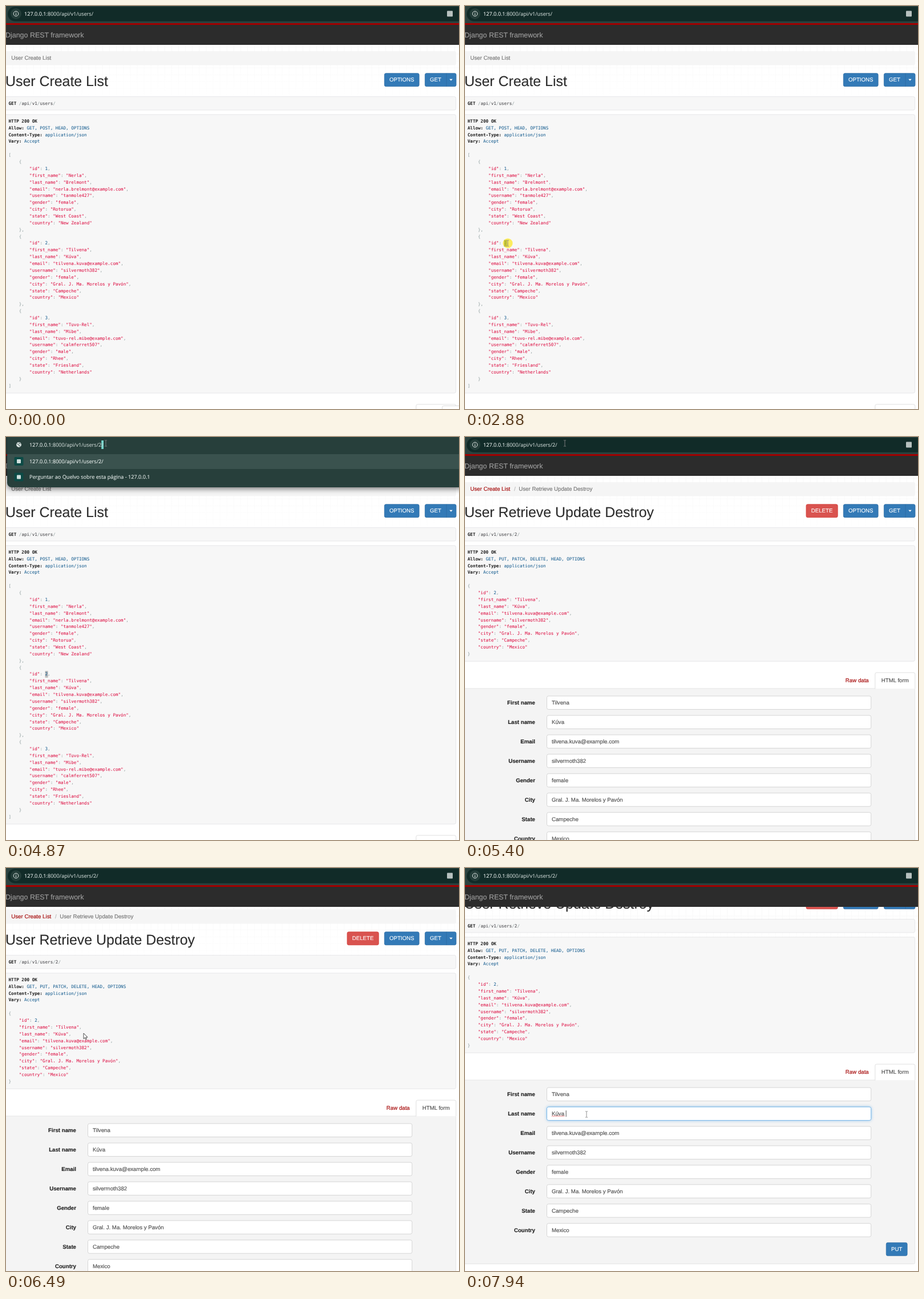
These frames come from a looping animation (794x705 px, 8000 ms). An HTML page:

```html
<!DOCTYPE html>
<html lang="en">
<head>
<meta charset="utf-8">
<title>User API</title>
<style>
  html, body { margin: 0; width: 100%; height: 100%; overflow: hidden; background: #fff; }
  svg { display: block; width: 794px; height: 705px; }
  text, tspan { fill: currentColor; stroke: currentColor; }
  text {
    white-space: pre; text-rendering: geometricPrecision; stroke-width: .14;
    font: 9.69px "Liberation Sans", Arial, sans-serif; color: #2d2d2d;
  }
  .mid { text-anchor: middle; }
  .label { text-anchor: end; font-weight: bold; color: #222; }
  .value { color: #4c4c4c; }
  .link { color: #a30000; }
  .muted { color: #737373; }
  .white { color: #fff; }
  .title { font-size: 24.9px; }
  .brand { font-size: 12.46px; color: #9d9d9d; }
  .code { font: 7.6px "DejaVu Sans Mono", "Noto Sans Mono", monospace; color: #48484c; stroke-width: .04; }
  .code .b { font-weight: bold; color: #222; }
  .code .str { color: #d14; }
  .code .lit { color: #195f91; }
  .code .pun { color: #93a1a1; }
  .ui { font: 9.12px "Open Sans", "Noto Sans", sans-serif; color: #e3eae8; }
  .ui .dim { color: #c3cecb; }
  .ui.dark { color: #0b2320; }
  .menu { filter: drop-shadow(0 3px 5px rgba(0, 0, 0, .5)); }
  .glow { filter: drop-shadow(0 0 2.5px rgba(102, 175, 233, .7)); }
</style>
</head>
<body>
<svg id="stage" viewBox="0 0 794 705"></svg>
<script>
const RIGHT = 789, LINE = 11.865, CHAR = 4.575, CODE_X = 4.5, PRE_TOP = 189.5;
const ROW_TOP = 464.8, ROW_STEP = 33.95;
const URL_LIST = '/api/v1/users/', URL_ITEM = '/api/v1/users/2/';

const FIELDS = ['id', 'first_name', 'last_name', 'email', 'username', 'gender', 'city', 'state', 'country'];
const USERS = [
  [1, 'Nerla', 'Brelmont', 'tanmole427', 'female', 'Rotorua', 'West Coast', 'New Zealand'],
  [2, 'Tilvena', 'Kúva', 'silvermoth382', 'female', 'Gral. J. Ma. Morelos y Pavón', 'Campeche', 'Mexico'],
  [3, 'Tuvo-Rel', 'Mibe', 'calmferret507', 'male', 'Rhee', 'Friesland', 'Netherlands']
].map(([id, first, last, ...rest]) => {
  const plain = `${first}.${last}`.toLowerCase().normalize('NFD').replace(/[\u0300-\u036f]/g, '');
  return [id, first, last, `${plain}@example.com`, ...rest];
});

// SVG helpers
const rect = (x, y, w, h, fill, stroke = 'none', r = 0, extra = '') =>
  `<rect x="${x}" y="${y}" width="${w}" height="${h}" rx="${r}" fill="${fill}" stroke="${stroke}" stroke-width=".8" ${extra}/>`;
const text = (x, y, s, cls = '') => `<text x="${x}" y="${y}" class="${cls}">${s}</text>`;
const span = (cls, s) => `<tspan class="${cls}">${s}</tspan>`;
const group = (id, inner) => `<g id="${id}">${inner}</g>`;
const path = (d, extra) => `<path d="${d}" ${extra}/>`;

const paintJson = line => line.replace(/("[^"]*")|(\d+)|([^\s"\d]+)/g,
  (m, str, num) => span(str ? 'str' : num ? 'lit' : 'pun', m));
const paintHeader = line => {
  const [name, value] = line.split(': ');
  return value ? span('b', name + ':') + ' ' + span('lit', value) : span('b', line);
};
const userLines = (user, pad) => [
  pad + '{',
  ...FIELDS.map((f, i) => `${pad}    "${f}": ${JSON.stringify(user[i])}${i < FIELDS.length - 1 ? ',' : ''}`),
  pad + '}'
];

const BUTTON_Y = 117.8, BUTTON_H = 22.9;
const button = (x, w, label, y = BUTTON_Y, fill = '#337ab7', stroke = '#2e6da4') =>
  rect(x, y, w, BUTTON_H, fill, stroke, 2.6) + text(x + w / 2, y + 14.5, label, 'mid white');

const getButton = hover => button(734.4, 54.6, '')
  + (hover ? group('hover', rect(734.4, BUTTON_Y, 37.6, BUTTON_H, '#286090', '#204d74', 2.6)) : '')
  + text(753, BUTTON_Y + 14.5, 'GET', 'mid white')
  + path(`M772 ${BUTTON_Y}v${BUTTON_H}`, 'stroke="#2e6da4"')
  + path('M777.2 127.8H782.8L780 130.7Z', 'fill="#fff"');

function page({ crumb, title, url, allow, json, buttons, hover = false, under = '' }) {
  const lines = ['HTTP 200 OK', `Allow: ${allow}`, 'Content-Type: application/json', 'Vary: Accept'].map(paintHeader)
    .concat('', json.map(paintJson));
  const height = lines.length * LINE + 12.6;
  const tabs = PRE_TOP + height + 20;
  return rect(-4, 79, RIGHT + 4, 24.4, '#f5f5f5', 'none', 2.8) + crumb
    + text(-1, 140.2, title, 'title') + buttons + getButton(hover)
    + rect(-4, 158.6, RIGHT + 3.6, 23.4, '#f7f7f7', '#e1e1e4', 2.8)
    + text(CODE_X, 173, span('b', 'GET ') + url.split('/').join(span('pun', '/')), 'code')
    + rect(-4, PRE_TOP + .4, RIGHT + 3.6, height, '#f7f7f7', '#e1e1e4', 2.8) + under
    + lines.map((s, i) => s && text(CODE_X, 203.9 + LINE * i, s, 'code')).join('')
    + rect(-4, tabs + 28, RIGHT + 3.6, 321.6, '#f4f4f4', '#e0e0e0', 2)
    + path(`M718.8 ${tabs + 28.6}V${tabs + 3}q0-2.8 2.8-2.8H786q2.8 0 2.8 2.8V${tabs + 28.6}`, 'fill="#fff" stroke="#ddd" stroke-width=".9"')
    + text(687.3, tabs + 17.1, 'Raw data', 'mid link') + text(753.8, tabs + 17.1, 'HTML form', 'mid value');
}

function form(user) {
  const rows = FIELDS.slice(1).map((f, i) => {
    const y = ROW_TOP + ROW_STEP * i;
    const label = f[0].toUpperCase() + f.slice(1).replace('_', ' ');
    return text(123, y + 3.3, label, 'label') + rect(143.5, y - 11.7, 568.2, 23.4, '#fff', '#ccc', 2.8)
      + (i === 1 ? group('focus', rect(143.5, y - 11.7, 568.2, 23.4, '#fff', '#66afe9', 2.8, 'class="glow"')
        + path(`M152 ${y + 5}` + 'l1.4-1.4l1.4 1.4'.repeat(8), 'fill="none" stroke="#e23b3b" stroke-width=".8"')
        + group('caret', rect(176.7, y - 5.6, .9, 11, '#444'))) : '')
      + text(152, y + 3.3, user[i + 1], 'value');
  });
  return rows.join('') + button(738.3, 36.8, 'PUT', 724.4);
}

const options = button(663.3, 60.8, 'OPTIONS');

const listPage = page({
  crumb: text(9.3, 94, 'User Create List', 'muted'), hover: true,
  title: 'User Create List', url: URL_LIST, allow: 'GET, POST, HEAD, OPTIONS', buttons: options,
  json: ['[', ...USERS.flatMap((u, i) => userLines(u, '    ').map((s, j) => s + (j === 10 && i < 2 ? ',' : ''))), ']'],
  under: `<rect id="picked" x="${CODE_X + 14 * CHAR}" y="409.3" width="5" height="11.6"/>`
});

const itemPage = page({
  crumb: text(9.3, 94, 'User Create List', 'link') + `<g opacity=".5">${text(86, 94, '/', 'muted')}</g>`
    + text(94.3, 94, 'User Retrieve Update Destroy', 'muted'),
  title: 'User Retrieve Update Destroy', url: URL_ITEM, allow: 'GET, PUT, PATCH, DELETE, HEAD, OPTIONS',
  buttons: button(598, 55.2, 'DELETE', BUTTON_Y, '#d9534f', '#d43f3a') + options,
  json: userLines(USERS[1], '')
}) + form(USERS[1]);

const address = (x, url, cls = '') => text(x, 17, '127.0.0.1' + span(cls ? '' : 'dim', ':8000' + url), 'ui ' + cls);

const bar = rect(0, 0, 794, 30, '#2b423f') + rect(3, 1.2, 810, 25.6, '#112b28', 'none', 12.8)
  + '<circle cx="17.5" cy="13.5" r="9.5" fill="#243d39"/>'
  + '<circle cx="17.5" cy="13.5" r="4.3" fill="none" stroke="#e3eae8"/>'
  + path('M17.5 11v1M17.5 13v3', 'stroke="#e3eae8" stroke-width="1.1"')
  + rect(773, 8.5, 10, 10, '#b7c1bf', 'none', 1)
  + group('urlList', address(32, URL_LIST)) + group('urlItem', address(32, URL_ITEM));

const menuRow = (y, s) => rect(14.5, y - 7.5, 16, 15, '#0d4b46', 'none', 2) + rect(19, y - 3.5, 7, 7, '#cfe0dd', 'none', 1)
  + text(41, y + 3.4, s, 'ui');
const globe = '<circle cx="22.5" cy="13.5" r="4.4" fill="#dde6e4"/>'
  + path('M19.5 12.2q3 .2 3 2t2.6 1.6M22.8 9.6q-.4 2 2.6 2.6', 'fill="none" stroke="#273f3b"');
const menu = h => rect(2, -12, 806, h + 12, '#273f3b', 'none', 8, 'class="menu"') + globe;
const askLabel = 'Perguntar ao Quelvo sobre esta página - 127.0.0.1';

const omnibox = group('ask', menu(62)
    + group('urlPicked', rect(40.6, 6, 121.4, 15, '#76d6cc') + address(41, URL_LIST, 'dark'))
    + group('urlCaret', address(41, URL_LIST) + rect(162, 7, .9, 13, '#e3eae8'))
    + menuRow(42.5, askLabel))
  + group('typed', menu(88) + rect(167.2, 6, 3.8, 15, '#76d6cc') + address(41, URL_ITEM)
    + rect(2, 30, 800, 26, '#3a524e') + menuRow(42.5, '127.0.0.1:8000' + URL_ITEM)
    + menuRow(70, askLabel));

const outline = 'fill="#fff" stroke="#222" stroke-width=".8" stroke-linejoin="round"';
const cursors = '<circle id="click" r="8.6" fill="#ffe600" fill-opacity=".62"/>'
  + group('arrow', path('M0 0V9.8L2.3 7.7L3.9 11.2L5.4 10.5L3.9 7.1H7Z', outline))
  + group('hand', path('M-1 7V1q1-1.6 2 0V5l1.6.2 1.6.4 1.4.8V9.4L4.8 12.6H0L-3.2 8.2q0-1.6 1.2-1Z', outline))
  + group('beam', path('M-2-5.2H-.5L0-4.6L.5-5.2H2M0-4.6V4.6M-2 5.2H-.5L0 4.6L.5 5.2H2', 'fill="none" stroke="#858585" stroke-width=".9"'));

const gridLines = Array.from({ length: 66 }, (_, i) => `M${i * 12.1} 68V165`).join('')
  + Array.from({ length: 8 }, (_, i) => `M0 ${72 + i * 12.1}H794`).join('');

const stage = document.getElementById('stage');
stage.innerHTML = '<defs><linearGradient id="fade" x2="0" y2="1"><stop stop-color="#fff" stop-opacity="0"/>'
  + '<stop offset="1" stop-color="#fff"/></linearGradient></defs>'
  + rect(0, 0, 794, 705, '#fff') + path(gridLines, 'stroke="#f6f6f6" stroke-width=".8"') + rect(0, 68, 794, 98, 'url(#fade)')
  + group('list', listPage) + group('item', itemPage)
  + rect(0, 29.6, 794, 3.6, '#a30000') + rect(0, 33, 794, 35, '#2c2c2c')
  + text(-1, 54.6, 'Django REST framework', 'brand') + bar + omnibox
  + group('popup', rect(764.5, 699.5, 60, 30, '#fff', '#d5d5d5', 3)) + group('cursor', cursors);

const $ = id => document.getElementById(id);
const show = (id, on) => $(id).setAttribute('visibility', on ? 'inherit' : 'hidden');
const within = (t, a, b) => t >= a && t < b;
const smooth = p => { p = Math.min(1, Math.max(0, p)); return p * p * (3 - 2 * p); };

// time, x, y, cursor shape from that time on
const MOVES = [
  [0, 800, 722, 'arrow'], [70, 791, 704, 'arrow'], [760, 757, 138, 'hand'], [820, 755, 131, 'hand'],
  [1100, 744, 124, 'hand'], [1300, 744, 124, 'hand'], [1370, 722, 136, 'arrow'], [1850, 110, 400, 'beam'],
  [2060, 71, 425, 'beam'], [2130, 70, 424, 'beam'], [2540, 69.5, 415, 'beam'], [2740, 69.5, 415, 'beam'],
  [2880, 75, 415, 'beam'], [3020, 75, 414, 'beam'], [3160, 92, 350, 'arrow'], [3640, 172, 28, 'beam'],
  [3780, 175, 11, 'beam'], [5880, 175, 11, 'beam'], [5990, 172, 36, 'arrow'], [6400, 136, 289, 'arrow'],
  [6760, 136, 289, 'arrow'], [7130, 205, 418, 'beam'], [7270, 213, 431, 'beam'], [8000, 213, 431, 'beam']
];
const CLICKS = [[2740, 3020], [3850, 4060], [7270, 7410]];

function drawCursor(t) {
  const i = MOVES.findIndex((m, k) => k === MOVES.length - 2 || t < MOVES[k + 1][0]);
  const [t0, x0, y0, shape] = MOVES[i], [t1, x1, y1] = MOVES[i + 1];
  const p = smooth((t - t0) / (t1 - t0));
  $('cursor').setAttribute('transform', `translate(${x0 + (x1 - x0) * p} ${y0 + (y1 - y0) * p})`);
  for (const s of ['arrow', 'hand', 'beam']) show(s, s === shape);
  show('hover', shape === 'hand');
  show('click', CLICKS.some(([a, b]) => within(t, a, b)));
}

function draw(t) {
  const loaded = t >= 5390;
  show('list', !loaded);
  show('item', loaded);
  show('urlList', t < 5330);
  show('urlItem', t >= 5330);
  show('popup', t < 70);
  drawCursor(t);
  $('picked').setAttribute('fill', t < 3850 ? '#5d7f95' : '#b9b9b9');
  show('picked', !loaded && t >= 2810);
  show('ask', within(t, 3850, 4870));
  show('urlPicked', within(t, 3850, 4600));
  show('urlCaret', within(t, 4600, 4870));
  show('typed', within(t, 4870, 5330));
  $('item').setAttribute('transform', `translate(0 ${-Math.round(69.2 * smooth((t - 6428) / 340))})`);
  show('focus', t >= 7340);
  show('caret', t >= 7340 && !within(t, 7810, 7935));
}

function tick() {
  draw(performance.now() % 8000);
  requestAnimationFrame(tick);
}
tick();
</script>
</body>
</html>
```
